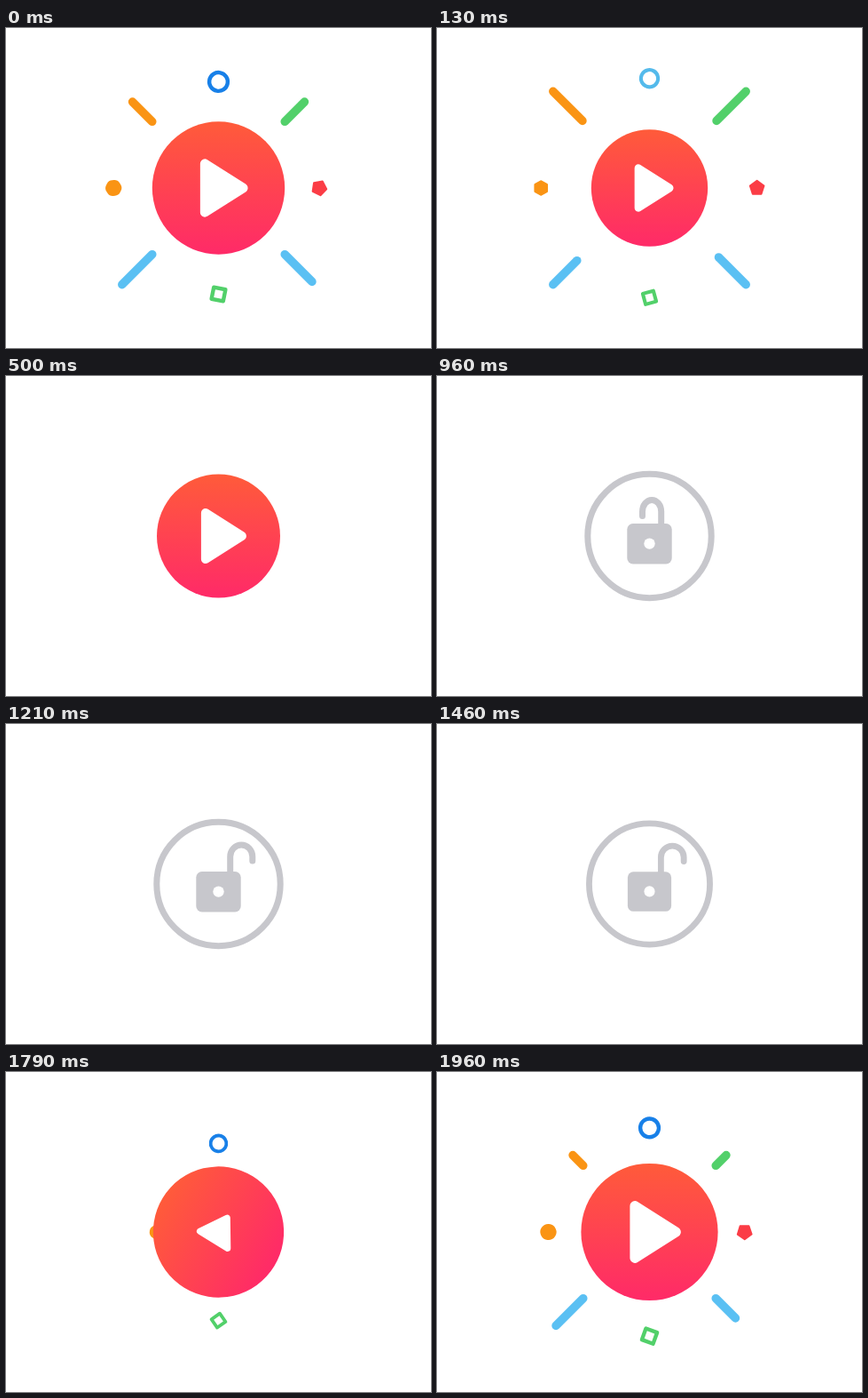
An HTML page with a canvas for the animation above (2000 ms loop, 479 by 360 pixels).

```html
<!DOCTYPE html>
<html lang="en">
<head>
<meta charset="utf-8">
<title>Unlock and play</title>
<style>
  html, body { margin: 0; width: 100%; height: 100%; overflow: hidden; background: #fff; }
  canvas { display: block; width: 479px; height: 360px; }
</style>
</head>
<body>
<canvas id="stage" width="479" height="360"></canvas>
<script>
const ctx = document.getElementById('stage').getContext('2d');
const LOOP = 2000, FPS = 24, TICKS = 48, LOCK_TICK = 18;
const CX = 239.5, CY = 180, TAU = Math.PI * 2;
const GREY = '#c7c7cc', ORANGE = '#fa9414', GREEN = '#52d06a', RED = '#fb3d46', SKY = '#5ac0f3';

// Easing helpers; all times are in ticks
const part = (t, a, b) => Math.min(1, Math.max(0, (t - a) / (b - a)));
const sine = x => (1 - Math.cos(Math.PI * x)) / 2;
const quad = x => x < 0.5 ? 2 * x * x : 1 - 2 * (1 - x) ** 2;
const mix = (a, b, x) => a + (b - a) * x;

// Sine-eased value through [tick, value] keys
function track(t, keys) {
  let value = keys[0][1];
  for (let k = 1; k < keys.length; k++) {
    const [a, from] = keys[k - 1], [b, to] = keys[k];
    if (t >= a) value = mix(from, to, sine(part(t, a, b)));
  }
  return value;
}

function group(x, y, scale, angle, paint) {
  ctx.save();
  ctx.translate(x, y);
  ctx.rotate(angle * Math.PI / 180);
  ctx.scale(scale, scale);
  paint();
  ctx.restore();
}

function disc(r, fill) {
  ctx.beginPath();
  ctx.arc(0, 0, Math.max(0, r), 0, TAU);
  ctx.fillStyle = fill;
  ctx.fill();
}

function ring(r, width, color) {
  ctx.beginPath();
  ctx.arc(0, 0, r, 0, TAU);
  ctx.lineWidth = width;
  ctx.strokeStyle = color;
  ctx.stroke();
}

function roundShape(points, radius, color) {
  ctx.beginPath();
  points.forEach(([x, y]) => ctx.lineTo(x, y));
  ctx.closePath();
  ctx.fillStyle = ctx.strokeStyle = color;
  ctx.lineWidth = radius * 2;
  ctx.lineJoin = 'round';
  ctx.fill();
  ctx.stroke();
}

function polygon(sides, r, radius, color) {
  const points = Array.from({ length: sides }, (_, k) => {
    const a = k * TAU / sides - Math.PI / 2;
    return [(r - radius) * Math.cos(a), (r - radius) * Math.sin(a)];
  });
  roundShape(points, radius, color);
}

function shackle(t) {
  const lift = 12 * (1 - quad(part(t, 18, 26)));
  const flip = mix(-1, 1, quad(part(t, 21, 30)));
  const leg = 13.2, arm = 2 * leg * flip, mid = leg + arm / 2, y = -30.8 + lift;
  ctx.beginPath();
  ctx.moveTo(leg, -10);
  ctx.lineTo(leg, y);
  ctx.ellipse(mid, y, Math.abs(arm / 2), leg, 0, flip < 0 ? 0 : Math.PI, flip < 0 ? Math.PI : TAU, flip < 0);
  ctx.lineTo(leg + arm, y + 4.8);
  ctx.lineWidth = 7;
  ctx.lineCap = ctx.lineJoin = 'round';
  ctx.strokeStyle = GREY;
  ctx.stroke();
}

function lock(t) {
  const outer = 73.2 - 2 * (Math.max(0, t - 32) / 3) ** 2.69 * 0.87;
  group(CX, CY, outer / 73.2, 0, () => {
    ring(69.7, 7, GREY);
    shackle(t);
    ctx.beginPath();
    ctx.roundRect(-25.2, -14, 50.4, 45.5, 6.5);
    ctx.fillStyle = GREY;
    ctx.fill();
    ctx.translate(0, 8.6);
    disc(6.2, '#fff');
  });
  const cover = Math.min(outer - 0.8, 54 * sine(part(t, 35, 39)));
  if (cover > 0) group(CX, CY, 1, 0, () => disc(cover, '#fff'));
}

function button(t) {
  const r = t < 46
    ? 78 * (1 - (1 - part(t, 36, 46)) ** 2.4)
    : track(t, [[46, 78], [52, 64.8], [60, 69.5]]);
  const turn = mix(-200, 0, sine(part(t, 36, 47)));
  const icon = track(t, [[39, 0], [46, 1.155], [51, 0.86], [59, 1]]);
  const fill = ctx.createLinearGradient(0, -r, 0, r);
  fill.addColorStop(0, '#ff5b3a');
  fill.addColorStop(1, '#ff2a68');
  group(CX, CY, 1, turn, () => {
    disc(r, fill);
    ctx.scale(icon, icon);
    if (icon > 0) roundShape([[-14.6, -26], [26.4, 0], [-14.6, 26]], 5, '#fff');
  });
}

// Each ray draws outwards, then its inner end catches up
const rays = [
  [-1, -1, 45, ORANGE], [1, -1, 45, GREEN], [1, 1, 44, SKY], [-1, 1, 43, SKY]
];

function ray(t, [dx, dy, start, color]) {
  const head = sine(part(t, start, start + 5)), tail = sine(part(t, start + 5, start + 15));
  if (head <= tail) return;
  const a = 74.7 + 34 * tail, b = 74.7 + 34 * head;
  ctx.beginPath();
  ctx.moveTo(CX + dx * a, CY + dy * a);
  ctx.lineTo(CX + dx * b, CY + dy * b);
  ctx.lineWidth = 9.5;
  ctx.lineCap = 'round';
  ctx.strokeStyle = color;
  ctx.stroke();
}

const hoopColor = t => {
  const x = part(t, 48, 51.3);
  return `rgb(${mix(24, 90, x)},${mix(128, 192, x)},${mix(232, 235, x)})`;
};

// Direction, reach, slowing rate, arrival tick, shrink start, shape
const bits = [
  [0, -1, 124, 0.25, 54.6, 48, t => ring(10.4, 4.4, hoopColor(t))],
  [0, 1, 124, 0.25, 54.6, 48, () => {
    ctx.lineWidth = 4.4;
    ctx.lineJoin = 'round';
    ctx.strokeStyle = GREEN;
    ctx.strokeRect(-6.7, -6.7, 13.4, 13.4);
  }],
  [-1, 0, 122.3, 0.43, 51.7, 49, t => polygon(6, 9.1, mix(9, 1.5, part(t, 47, 51)), ORANGE)],
  [1, 0, 121.5, 0.43, 52.65, 50, () => polygon(5, 9.3, 1, RED)]
];

function bit(t, [dx, dy, reach, rate, arrive, fade, paint]) {
  const d = reach - (rate * Math.max(0, arrive - t)) ** 3;
  const scale = sine(part(t, 40, 44)) * (1 - part(t, fade, fade + 11) ** 2);
  const spin = 20 - 8.8 * (t - 47) + (dx ? 15.2 : 0);
  if (scale > 0) group(CX + dx * d, CY + dy * d, scale, spin, () => paint(t));
}

function draw(ms) {
  const tick = Math.floor((ms % LOOP + 4.9) * FPS / 1000) % TICKS;
  const t = tick < LOCK_TICK ? tick + TICKS : tick;
  ctx.fillStyle = '#fff';
  ctx.fillRect(0, 0, 479, 360);
  if (t < 41) lock(t);
  if (t > 40 && t < 60) {
    rays.forEach(r => ray(t, r));
    bits.forEach(b => bit(t, b));
  }
  if (t > 36) button(t);
}

const start = performance.now();
function loop() {
  draw(performance.now() - start);
  requestAnimationFrame(loop);
}
loop();
</script>
</body>
</html>
```
